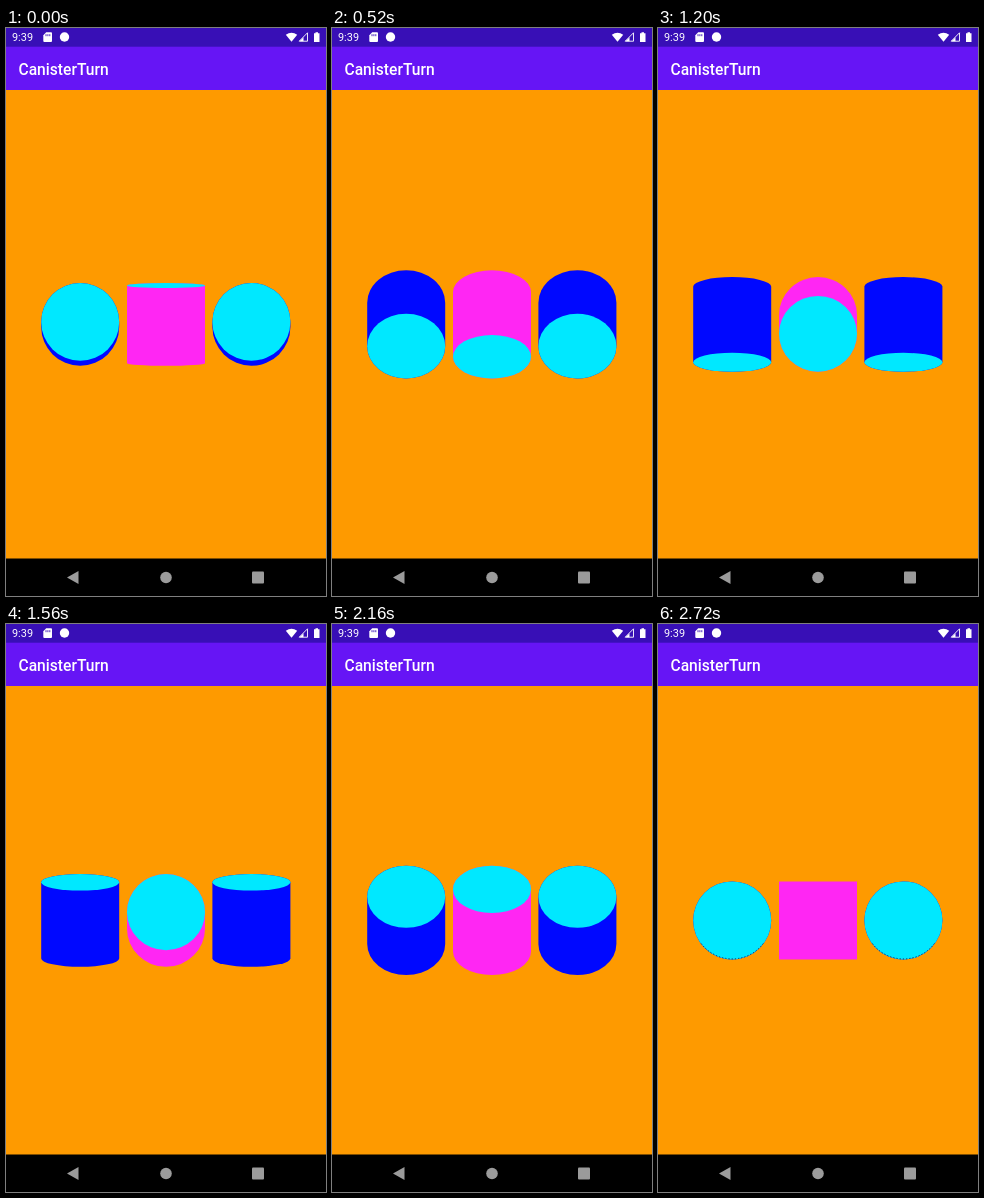
An HTML page that plays this animation: 320 by 568 pixels, repeating every 2760 ms.

```html
<!DOCTYPE html>
<html lang="en">
<head>
<meta charset="utf-8">
<title>CanisterTurn</title>
<style>
html, body { margin: 0; width: 100%; height: 100%; overflow: hidden; background: #000; }
svg { display: block; width: 320px; height: 568px; }
text { font-family: Roboto, sans-serif; fill: #fff; }
</style>
</head>
<body>
<svg viewBox="0 0 320 568">
  <rect width="320" height="568" fill="#fe9a00"/>
  <rect width="320" height="62" fill="#6615f5"/>
  <rect width="320" height="18.7" fill="#380fb6"/>
  <rect y="530.5" width="320" height="37.5" fill="#000"/>

  <text x="6" y="13.2" font-size="10.9">9:39</text>
  <text x="12.5" y="46.5" font-size="15.6" font-weight="500">CanisterTurn</text>

  <g fill="#fff">
    <path d="M40.2 4.2H45a1 1 0 0 1 1 1V13a1 1 0 0 1-1 1H38.300a1 1 0 0 1-1-1V7.200Z"/>
    <path d="M40 6.200v2M41.900 6.200v2M43.800 6.200v2" stroke="#380fb6" stroke-width=".9"/>
    <circle cx="58.500" cy="9" r="4.700"/>
    <path d="M279.800 6.800Q285.500 2.600 291.200 6.800L285.500 13.700Z"/>
    <path d="M301.500 4.800V13.200H293.200Z" fill="none" stroke="#fff" stroke-width=".9"/>
    <path d="M297.500 9.200V13.200H293.500Z"/>
    <path d="M309.500 4.200h2.500v1h1.500v8.800h-5.500V5.200h1.500Z"/>
  </g>

  <g id="cans"></g>

  <g fill="#9b9b9b">
    <path d="M61 549.400L72.500 543V556Z"/>
    <circle cx="160" cy="549.500" r="5.800"/>
    <rect x="246" y="543.500" width="12" height="12" rx="1"/>
  </g>
</svg>
<script>
const LOOP = 2760, STEP = 40, R = 39, CY = 296.4;
// [time in ms, tilt in degrees]
const keys = [[0, -3.7], [240, 14], [760, 51], [1200, 76], [1920, 128.5], [2400, 157], [2720, 180]];

function add(parent, tag, attrs) {
  const el = document.createElementNS('http://www.w3.org/2000/svg', tag);
  set(el, attrs);
  return parent.appendChild(el);
}

function set(el, attrs) {
  for (const k in attrs) el.setAttribute(k, attrs[k]);
}

const layer = document.getElementById('cans');
const cans = [74.2, 160, 245.4].map((x, i) => ({
  x,
  upright: i === 1,
  body: add(layer, 'path', { fill: i === 1 ? '#ff26f3' : '#0008ff' }),
  cap: add(layer, 'ellipse', { cx: x, rx: R, fill: '#00e8ff' }),
  rim: add(layer, 'path', {
    d: `M${x - 31} ${CY + 23.2}A${R} ${R} 0 0 0 ${x + 31} ${CY + 23.2}`,
    fill: 'none', stroke: '#101850', 'stroke-width': 0.9, 'stroke-dasharray': '1.2 2'
  })
}));

function tilt(t) {
  let i = 1;
  while (i < keys.length - 1 && t > keys[i][0]) i++;
  const [t0, a0] = keys[i - 1], [t1, a1] = keys[i];
  return a0 + (a1 - a0) * (t - t0) / (t1 - t0);
}

function drawCan(can, deg) {
  const a = deg * Math.PI / 180;
  const side = Math.cos(a) < 0 ? -1 : 1; // the end that faces the viewer
  const off = R * Math.sin(a) * side;
  const ry = R * Math.abs(Math.cos(a));
  const top = CY - Math.abs(off), bottom = CY + Math.abs(off);
  const l = can.x - R, r = can.x + R;
  set(can.body, {
    d: `M${l} ${top}A${R} ${ry} 0 0 1 ${r} ${top}V${bottom}A${R} ${ry} 0 0 1 ${l} ${bottom}Z`
  });
  set(can.cap, { cy: CY + off, ry });
  set(can.rim, { visibility: Math.abs(off) < 0.3 ? 'visible' : 'hidden' });
}

function draw(ms) {
  const t = Math.floor(ms % LOOP / STEP) * STEP;
  const deg = tilt(t);
  for (const can of cans) drawCan(can, can.upright ? 90 - deg : deg);
}

let start;
function tick(now) {
  start ??= now;
  draw(Math.max(0, now - start));
  requestAnimationFrame(tick);
}
draw(0);
requestAnimationFrame(tick);
</script>
</body>
</html>
```
